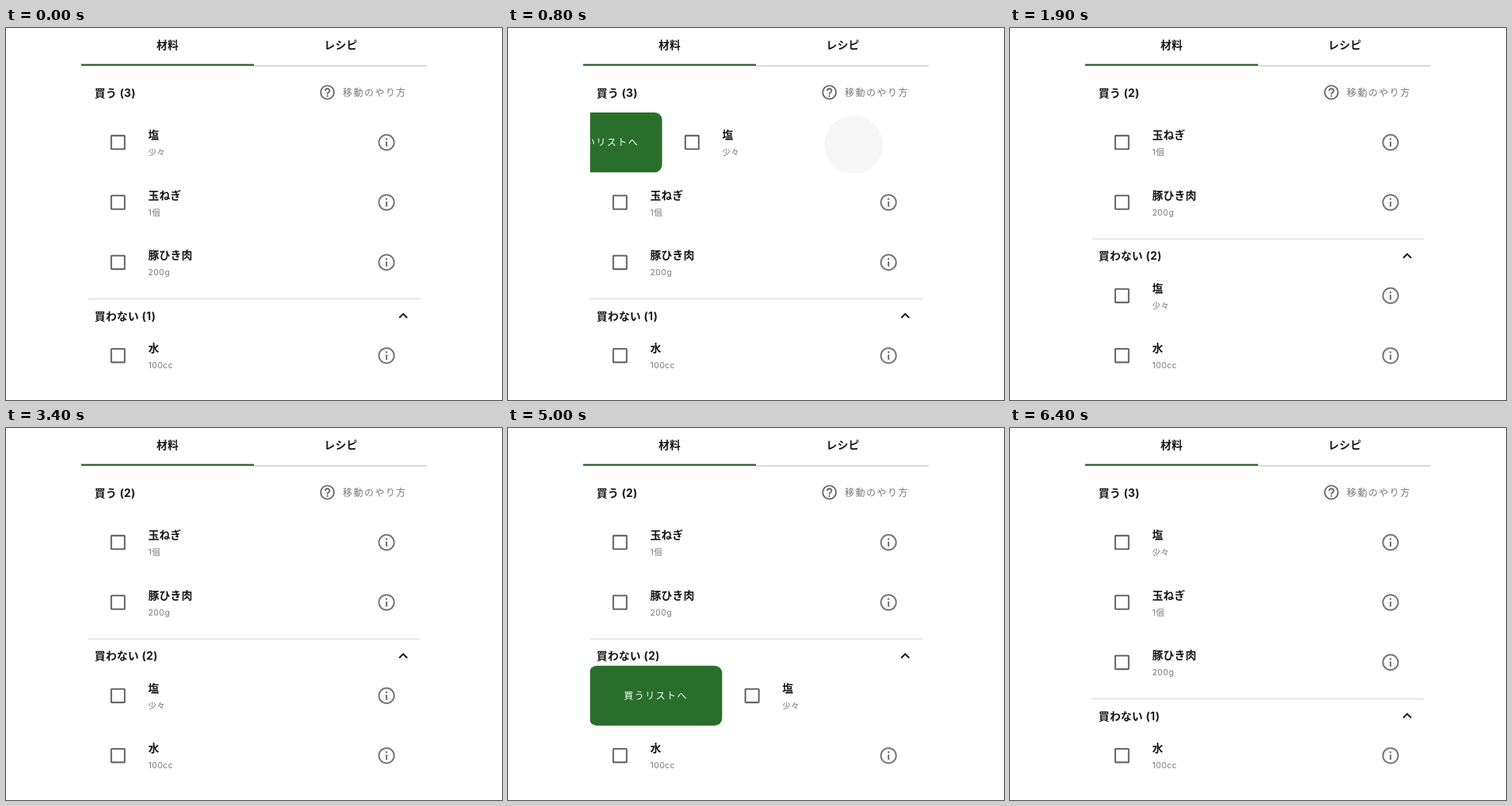
Animation of 640x480 px, one loop 7 s. Source, as an HTML page:

```html
<!DOCTYPE html>
<html lang="ja">
<head>
<meta charset="utf-8">
<title>材料リスト</title>
<style>
  html, body { margin: 0; width: 100%; height: 100%; overflow: hidden; background: #fff; }
  svg { display: block; width: 640px; height: 480px; }
  text { font-family: Inter, "Noto Sans CJK JP", "Noto Sans CJK", sans-serif; white-space: pre; }
  .title { font-size: 14px; font-weight: 700; letter-spacing: .35px; fill: #161616; }
  .note { font-size: 10.6px; letter-spacing: .5px; fill: #777; }
  .label { font-size: 12.2px; letter-spacing: 1.6px; fill: #777; }
  .on-card { fill: #fff; }
  .card { fill: #296f2b; }
  .line { stroke: #d2d2d2; }

  .before, .after, .swipe, .touch { animation: 7s step-end infinite; }
  .before { animation-name: before; }
  .after { animation-name: after; }
  .swipe { animation-name: swipe; }
  .touch { animation-name: touch; opacity: 0; }
  /* the second swipe repeats the first one four seconds later */
  .after .swipe, .after .touch { animation-delay: -3s; }

  @keyframes before {
    0%, 84.28% { visibility: visible; }
    27.14% { visibility: hidden; }
  }
  @keyframes after {
    0%, 84.28% { visibility: hidden; }
    27.14% { visibility: visible; }
  }
  @keyframes swipe {
    0%, 27.14% { transform: translateX(0); }
    9.99% { transform: translateX(47px); }
    11.42% { transform: translateX(93px); }
    12.85% { transform: translateX(142px); }
    14.28% { transform: translateX(170.5px); }
    15.71% { transform: translateX(171.4px); }
  }
  @keyframes touch {
    0%, 12.85% { opacity: 0; }
    9.99% { opacity: .08; transform: translate(368px, 3px); }
    11.42% { opacity: .037; transform: translate(446px, 3px) scale(2.53); }
  }
</style>
</head>
<body>
<svg viewBox="0 0 640 480">
  <defs>
    <clipPath id="row-clip"><rect x="106" y="-38.7" width="428" height="77.4"/></clipPath>
    <g id="tools">
      <rect x="135.8" y="-8.7" width="17.4" height="17.4" rx=".8" fill="none" stroke="#666" stroke-width="2.1"/>
      <circle cx="491" r="9.8" fill="none" stroke="#777" stroke-width="2"/>
      <path d="M489.9 -5.4h2.2v2.2h-2.2zM489.9 -1.1h2.2v6.5h-2.2z" fill="#777"/>
    </g>
    <rect id="card" class="card" x="-65.6" y="-38.7" width="171.4" height="77.4" rx="9.5"/>
    <path id="chevron" d="M507.4 3.2l5.1 -5.1l5.1 5.1" fill="none" stroke="#161616" stroke-width="2"/>
    <g id="salt">
      <use href="#tools"/>
      <text class="title" x="183.4" y="-4.3">塩</text>
      <text class="note" x="183.4" y="16.8">少々</text>
    </g>
    <g id="onion">
      <use href="#tools"/>
      <text class="title" x="183.4" y="-4.3">玉ねぎ</text>
      <text class="note" x="183.4" y="16.8">1個</text>
    </g>
    <g id="pork">
      <use href="#tools"/>
      <text class="title" x="183.4" y="-4.3">豚ひき肉</text>
      <text class="note" x="183.4" y="16.8">200g</text>
    </g>
  </defs>

  <text class="title" x="194.2" y="27.2">材料</text>
  <text class="title" x="410.6" y="27.2">レシピ</text>
  <path d="M320 48.9H543" stroke="#c2c2c2" stroke-width="1.4"/>
  <path d="M97 47.6H320" stroke="#1f5a22" stroke-width="2.4"/>

  <g transform="translate(414.7 83)" fill="#666">
    <circle r="8.6" fill="none" stroke="#666" stroke-width="1.9"/>
    <path transform="scale(.95) translate(-12 -12)" d="M11 18h2v-2h-2zM12 6c-2.21 0-4 1.79-4 4h2c0-1.1.9-2 2-2s2 .9 2 2c0 2-3 1.75-3 5h2c0-2.25 3-2.5 3-5 0-2.21-1.79-4-4-4z"/>
  </g>
  <text class="label" x="434.6" y="87.8">移動のやり方</text>

  <g transform="translate(0 422.7)">
    <use href="#tools"/>
    <text class="title" x="183.4" y="-4.3">水</text>
    <text class="note" x="183.4" y="16.8">100cc</text>
  </g>

  <g class="before">
    <text class="title" x="114.3" y="88.6">買う (3)</text>
    <g transform="translate(0 147.6)" clip-path="url(#row-clip)">
      <g class="swipe">
        <use href="#card"/>
        <text class="label on-card" x="-34.4" y="4.7">買わないリストへ</text>
        <use href="#salt"/>
      </g>
      <circle class="touch" r="15"/>
    </g>
    <use href="#onion" y="225"/>
    <use href="#pork" y="302.4"/>
    <path class="line" d="M106 349.5H534.5"/>
    <text class="title" x="114.3" y="376.6">買わない (1)</text>
    <use href="#chevron" y="370.8"/>
  </g>

  <g class="after">
    <text class="title" x="114.3" y="88.6">買う (2)</text>
    <use href="#onion" y="147.6"/>
    <use href="#pork" y="225"/>
    <path class="line" d="M106 272.2H534.5"/>
    <text class="title" x="114.3" y="299.3">買わない (2)</text>
    <use href="#chevron" y="293.5"/>
    <g transform="translate(0 345.4)" clip-path="url(#row-clip)">
      <g class="swipe">
        <use href="#card"/>
        <text class="label on-card" x="-21.1" y="4.7">買うリストへ</text>
        <use href="#salt"/>
      </g>
      <circle class="touch" r="15"/>
    </g>
  </g>
</svg>
</body>
</html>
```
